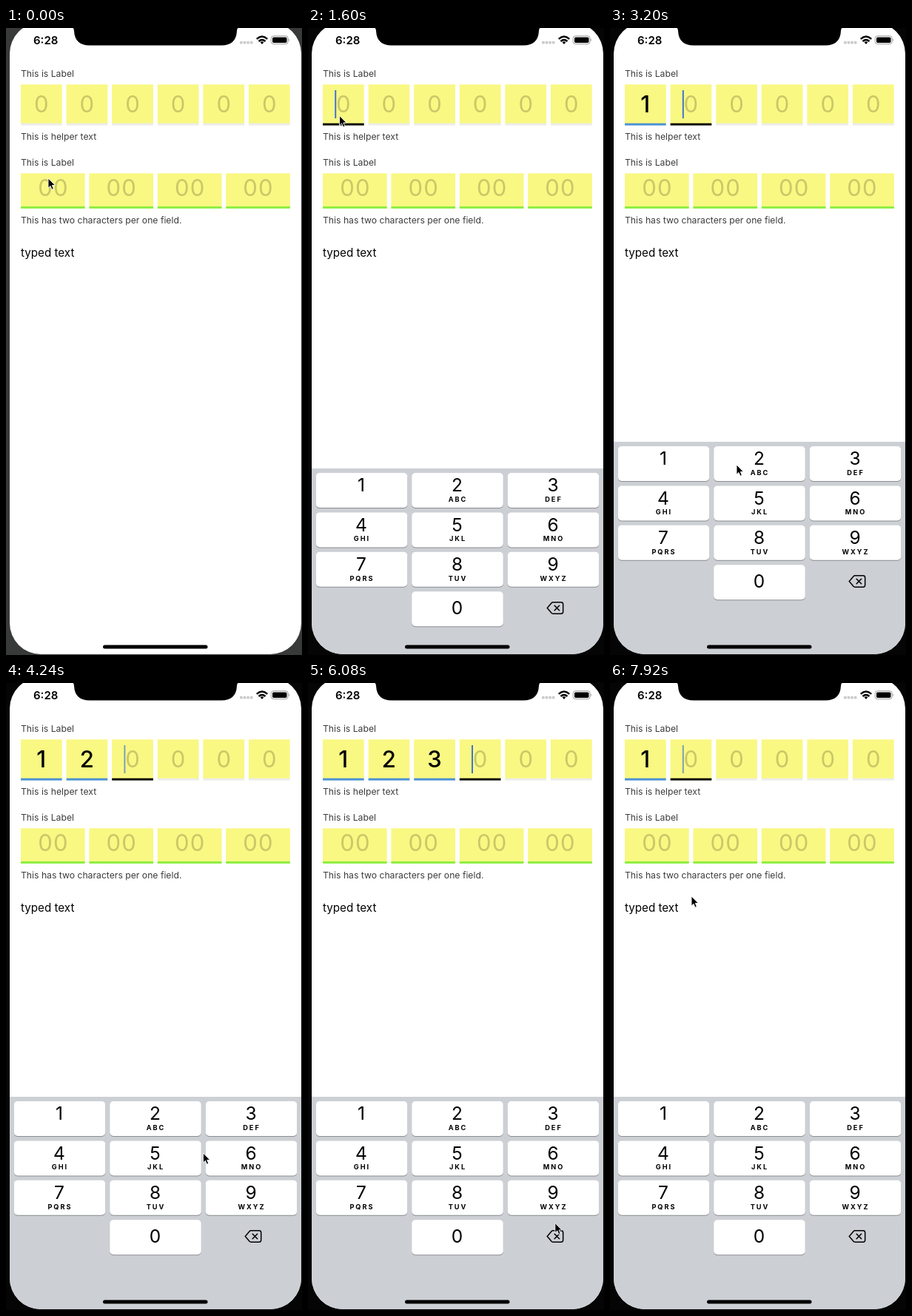
An HTML page for the animation above (8 s loop, 400 by 847 pixels).

```html
<!DOCTYPE html>
<html lang="en">
<head>
<meta charset="utf-8">
<title>Code input</title>
<style>
  html, body { margin: 0; width: 100%; height: 100%; overflow: hidden; background: #050505; }
  svg { display: block; width: 400px; height: 847px; font-family: Inter, "Open Sans", sans-serif; }
  .label { font-size: 12.2px; fill: #3c3c3c; }
  .typed { font-size: 15.2px; }
  .clock { font-size: 15px; font-weight: 600; }
  .cell { font-size: 31px; text-anchor: middle; fill: #c9c869; }
  .cell.filled { fill: #000; font-weight: 500; }
  .pair { letter-spacing: 1.2px; }
  .num { font-size: 24.5px; text-anchor: middle; }
  .abc { font-size: 9.2px; font-weight: 700; letter-spacing: 2px; text-anchor: middle; }
</style>
</head>
<body>
<svg id="stage" viewBox="0 0 400 847">
  <defs>
    <clipPath id="screen"><rect x="5" y="-7.5" width="394" height="853.5" rx="42"/></clipPath>
  </defs>
  <rect id="bezel" width="400" height="847"/>
  <g clip-path="url(#screen)">
    <rect x="5" y="-8" width="394" height="855" fill="#fff"/>
    <g id="form">
      <text class="label" x="20" y="65.5">This is Label</text>
      <text class="label" x="20" y="151">This is helper text</text>
      <text class="label" x="20" y="185.5">This is Label</text>
      <text class="label" x="20" y="263.5">This has two characters per one field.</text>
      <text class="typed" x="20" y="308.7">typed text</text>
    </g>
    <rect id="caret" y="84" width="2" height="38" fill="#4274d2"/>
    <g id="pad"><rect x="5" y="559" width="394" height="290" fill="#cccfd4"/></g>
    <rect x="131" y="833.5" width="141.5" height="5" rx="2.5"/>
  </g>
  <path id="notch" d="M87 -1 Q92 -1 92 4 Q93 23.500 113 23.500 H291 Q311 23.500 312 4 Q312 -1 317 -1 Z"/>
  <text class="clock" x="37" y="21.800">6:28</text>
  <g id="status">
    <g fill="none" stroke="#000" stroke-width="2.500">
      <path d="M338.800 14.800 Q346 8.200 353.200 14.800"/>
      <path d="M341.500 18 Q346 13.900 350.500 18"/>
    </g>
    <path d="M343.600 19.300 Q346 17.300 348.400 19.300 L346 22 Z"/>
    <rect x="358.300" y="10.800" width="22.800" height="10.800" rx="3" fill="none" stroke="#9a9a9a"/>
    <rect x="360" y="12.400" width="19.500" height="7.600" rx="1.700"/>
    <path d="M382.300 14.300 Q384.200 16.200 382.300 18.100 Z" fill="#9a9a9a"/>
  </g>
  <path id="pointer" d="M0 0 V13.200 L3 10.400 L5 15.200 L7.300 14.200 L5.300 9.500 H9.400 Z"
        stroke="#fff" stroke-width="0.900" stroke-linejoin="round"/>
</svg>
<script>
const LOOP = 8000, STEP = 80;
const $ = id => document.getElementById(id);

function add(parent, tag, attrs, text) {
  const el = document.createElementNS("http://www.w3.org/2000/svg", tag);
  for (const k in attrs) el.setAttribute(k, attrs[k]);
  if (text) el.textContent = text;
  return parent.appendChild(el);
}

const cellX = i => 20 + i * 61.6;

// single digit fields
const cells = Array.from({ length: 6 }, (_, i) => {
  const x = cellX(i);
  add($("form"), "rect", { x, y: 76.3, width: 55.7, height: 53, fill: "#f9f882" });
  return {
    line: add($("form"), "rect", { x, y: 128.7, width: 55.7, height: 2.9 }),
    text: add($("form"), "text", { x: x + 27.8, y: 114.3 })
  };
});

// double digit fields
for (let i = 0; i < 4; i++) {
  const x = 20 + i * 92.4, width = 86.7;
  add($("form"), "rect", { x, y: 196.3, width, height: 46, fill: "#f9f882" });
  add($("form"), "rect", { x, y: 241, width, height: 2.9, fill: "#8cee40" });
  add($("form"), "text", { x: x + 43.9, y: 227, class: "cell pair" }, "00");
}

// number pad
const letters = ["", "ABC", "DEF", "GHI", "JKL", "MNO", "PQRS", "TUV", "WXYZ"];
const keys = {};
function addKey(n, col, row) {
  const box = { x: 10.7 + col * 129.5, y: 565 + row * 53.4, width: 123.6, height: 47, rx: 5 };
  const mid = box.x + 61.8;
  add($("pad"), "rect", { ...box, y: box.y + 1, fill: "#8b8d91" });
  keys[n] = add($("pad"), "rect", box);
  add($("pad"), "text", { x: mid - 0.5, y: box.y + (n ? 25.2 : 31), class: "num" }, String(n));
  if (n) add($("pad"), "text", { x: mid + 0.5, y: box.y + 39, class: "abc" }, letters[n - 1]);
}
for (let n = 1; n <= 9; n++) addKey(n, (n - 1) % 3, Math.floor((n - 1) / 3));
addKey(0, 1, 3);

const del = add($("pad"), "path", {
  d: "M331 739.800 H342 Q344.700 739.800 344.700 742.500 V752.500 Q344.700 755.200 342 755.200 H331 Q329.800 755.200 329 754.300 L323.300 747.500 L329 740.700 Q329.800 739.800 331 739.800 Z",
  stroke: "#000", "stroke-width": 1.5
});
const cross = add($("pad"), "path", {
  d: "M333.200 744.300 L339.600 750.700 M339.600 744.300 L333.200 750.700", "stroke-width": 1.6, "stroke-linecap": "round"
});

for (let i = 0; i < 4; i++)
  add($("status"), "rect", { x: 316 + i * 4.6, y: 17.8, width: 3.7, height: 3.7, rx: 1.2, fill: "#cbcbcb" });

// time, x, y
const path = [
  [0, 57, 203], [480, 57, 203], [960, 40, 108], [1520, 40, 108], [1920, 65, 209],
  [2160, 65, 209], [2400, 88, 500], [2560, 74, 593], [2960, 74, 593], [3200, 171, 590],
  [3840, 171, 590], [4400, 290, 646], [4720, 317, 592], [5120, 317, 592], [5280, 301, 603],
  [5440, 301, 603], [6160, 335, 734], [7520, 335, 734], [7920, 110, 288], [8000, 110, 288]
];
// time, typed value
const edits = [[1440, ""], [2880, "1"], [3680, "12"], [4960, "123"], [7040, "12"], [7360, "1"]];
// key, down, up
const presses = [["1", 2800, 2960], ["2", 3600, 3760], ["3", 4880, 5040], ["del", 6960, 7040]];

const clamp = v => Math.min(1, Math.max(0, v));
const smooth = p => p * p * (3 - 2 * p);

function pointerAt(t) {
  const i = path.findIndex(p => p[0] > t);
  const [t0, x0, y0] = path[i - 1], [t1, x1, y1] = path[i];
  const p = smooth((t - t0) / (t1 - t0));
  return [x0 + (x1 - x0) * p, y0 + (y1 - y0) * p];
}

function caretAlpha(age) {
  const a = age % 1000;
  return a < 700 ? 1 - clamp((a - 500) / 180) : clamp((a - 760) / 140);
}

function draw(t) {
  $("bezel").setAttribute("fill", t < 960 ? "#383939" : "#050505");
  $("pointer").setAttribute("transform", `translate(${pointerAt(t)})`);

  const edit = edits.filter(e => e[0] <= t).pop();
  const value = edit ? edit[1] : "";
  const focus = edit ? value.length : -1;
  cells.forEach(({ line, text }, i) => {
    const filled = i < value.length;
    text.textContent = filled ? value[i] : "0";
    text.setAttribute("class", filled ? "cell filled" : "cell");
    line.setAttribute("fill", i === focus ? "#000" : filled ? "#4a90d5" : "#ececea");
  });
  $("caret").setAttribute("x", cellX(Math.max(0, focus)) + 16.2);
  $("caret").setAttribute("opacity", edit ? caretAlpha(t - edit[0]) : 0);

  const rise = 1 - Math.pow(1 - clamp((t - 1400) / 400), 3);
  $("pad").setAttribute("transform", `translate(0 ${288 * (1 - rise)})`);

  const down = presses.find(p => t >= p[1] && t < p[2]);
  const held = down ? down[0] : "";
  for (const n in keys) keys[n].setAttribute("fill", n === held ? "#b3b8c1" : "#fff");
  del.setAttribute("fill", held === "del" ? "#000" : "none");
  cross.setAttribute("stroke", held === "del" ? "#fff" : "#000");
}

const start = performance.now();
function tick() {
  const t = (performance.now() - start) % LOOP;
  draw(Math.floor(t / STEP) * STEP);
  requestAnimationFrame(tick);
}
tick();
</script>
</body>
</html>
```
